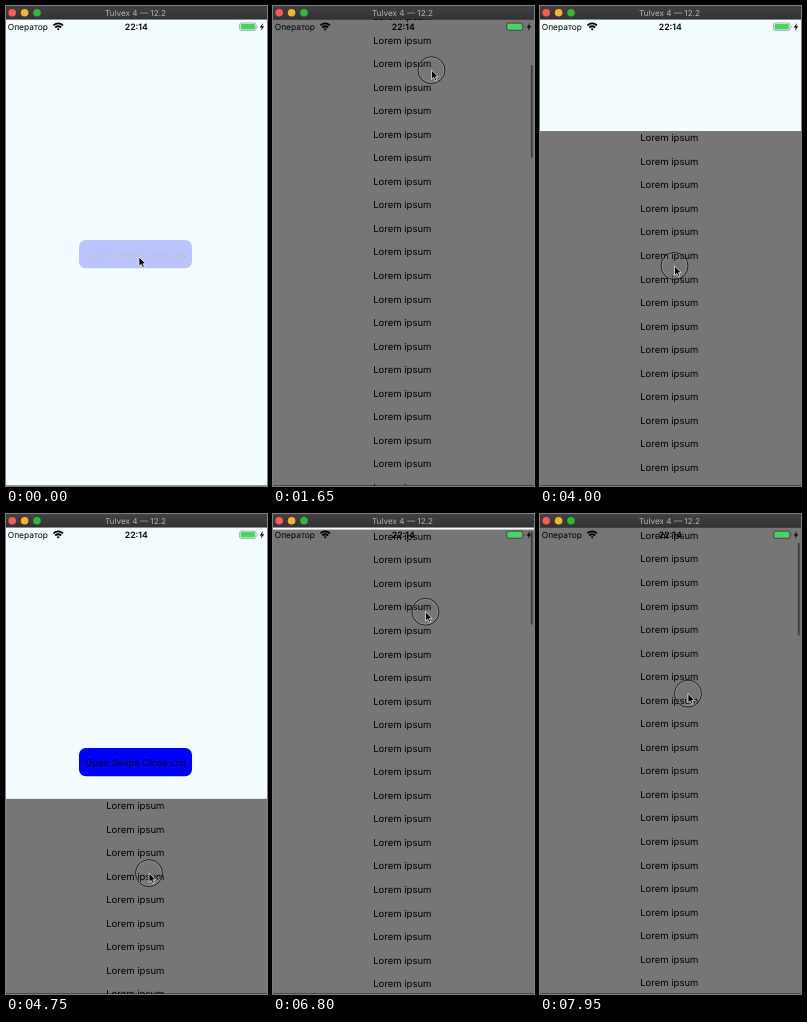
Recreate the animation shown at these times as an HTML page. Size 261 px wide and 480 px high, loop 8000 ms.

```html
<!DOCTYPE html>
<html lang="en">
<head>
<meta charset="utf-8">
<title>Swipe to close list</title>
<style>
  html, body { margin: 0; width: 100%; height: 100%; overflow: hidden; background: #f3fdff; }
  svg { display: block; width: 100vw; height: 100vh; }
  text { font: 9.5px Inter, Roboto, sans-serif; text-anchor: middle; text-rendering: geometricPrecision; }
  .title { font-size: 8.2px; fill: #b4b4b6; }
  .status { font-size: 8.4px; }
  .carrier { text-anchor: start; }
  .clock { font-weight: 600; font-size: 8.7px; }
</style>
</head>
<body>
<svg viewBox="0 0 261 480">
  <defs>
    <linearGradient id="chrome" x2="0" y2="1">
      <stop stop-color="#424244"/><stop offset="1" stop-color="#323234"/>
    </linearGradient>
  </defs>
  <rect width="261" height="480" fill="#f3fdff"/>

  <g id="button">
    <rect x="73" y="234" width="113" height="28.3" rx="6.8" fill="#00f"/>
    <text x="129.6" y="251.6">Open Swipe Close List</text>
  </g>

  <g id="sheet">
    <rect width="261" height="480" fill="#767676"/>
    <g id="rows"></g>
    <rect id="bar" x="257.8" width="1.9" height="93" rx=".9" fill="#404040"/>
  </g>

  <g id="statusbar">
    <text class="status carrier" x="1.8" y="24">Оператор</text>
    <path d="M47.4 19.4Q52.2 15.2 57 19.4M49.2 21.5Q52.2 19 55.2 21.5" fill="none" stroke="#000" stroke-width="1.7"/>
    <path d="M50.7 22.9Q52.2 21.8 53.7 22.9L52.2 24.5Z"/>
    <text class="status clock" x="130.3" y="24">22:14</text>
    <rect x="233.6" y="17" width="16.4" height="7.6" rx="2" fill="none" stroke="#000" stroke-opacity=".45" stroke-width=".7"/>
    <rect x="234.7" y="18.1" width="14.2" height="5.4" rx="1.1" fill="#45d45f"/>
    <path d="M251 19.5q1.3 1.3 0 2.6z" fill-opacity=".5"/>
    <path d="M257 17l-3.3 4.4h2l-.8 3.4 3.3-4.6h-2z"/>
  </g>

  <rect width="261" height="13" fill="url(#chrome)"/>
  <rect y="13" width="261" height="1" fill-opacity=".45"/>
  <circle cx="6.2" cy="6.8" r="3.8" fill="#fc5b53"/>
  <circle cx="18.6" cy="6.8" r="3.8" fill="#f6b42c"/>
  <circle cx="31" cy="6.8" r="3.8" fill="#2fb936"/>
  <text class="title" x="129.5" y="9.9">Tulvex 4 — 12.2</text>
  <rect y="479" width="261" height="1" fill-opacity=".4"/>

  <g id="pointer">
    <g id="touch" fill="none">
      <circle r="13.4" stroke="#1c1c1c"/>
      <circle r="12.5" stroke="#fff" stroke-opacity=".3" stroke-width=".7"/>
    </g>
    <path d="M0 0V9.2L2.2 7.3 3.7 10.5 5.3 9.8 3.9 6.7H6.8Z" stroke="#fff" stroke-width=".7"/>
  </g>
</svg>

<script>
const LOOP = 8000, TOP = 13, HEIGHT = 467, PITCH = 23.55;
const $ = id => document.getElementById(id);

const progress = (t, from, to) => Math.min(1, Math.max(0, (t - from) / (to - from)));
const ramp = (t, from, to) => {
  const u = progress(t, from, to);
  return u * u * (3 - 2 * u);
};
const pulse = (t, from, to) => ramp(t, from, from + 80) - ramp(t, to, to + 250);

// Fraction of the sheet pushed below the screen: open, drag away, reopen, short pull.
function sheetShift(t) {
  return 1 - ramp(t, 100, 600)
    + .65 * progress(t, 3475, 4900) + .35 * ramp(t, 4900, 5150)
    - ramp(t, 5750, 6250)
    + .28 * (ramp(t, 6760, 7250) - ramp(t, 7400, 7720));
}

function scrollOffset(t) {
  return 300 * (ramp(t, 1060, 1950) - ramp(t, 2050, 2728)) + 88 * ramp(t, 7720, 8050);
}

// Pointer stops; "down" means the finger touches until the next stop.
const stops = [
  { at: 300, x: 133, y: 251 },
  { at: 1000, x: 150, y: 285, down: true },
  { at: 1700, x: 158.6, y: 61 },
  { at: 2050, x: 156, y: 100, down: true },
  { at: 2550, x: 144.3, y: 350 },
  { at: 3400, x: 130.5, y: 213, down: true },
  { at: 5100, x: 144.5, y: 377 },
  { at: 5550, x: 131, y: 250, down: true },
  { at: 5660, x: 131, y: 250 },
  { at: 6750, x: 152.5, y: 95, down: true },
  { at: 7350, x: 152, y: 230 },
  { at: 7700, x: 150, y: 249, down: true },
  { at: 8100, x: 147, y: 148 }
];

function pointerAt(t) {
  const next = stops.findIndex(stop => stop.at > t);
  const b = stops[next], a = stops[next - 1] || b;
  const u = ramp(t, a.at, b.at);
  return { x: a.x + (b.x - a.x) * u, y: a.y + (b.y - a.y) * u, down: a !== b && a.down };
}

for (let i = 0; i < 36; i++) {
  const row = document.createElementNS("http://www.w3.org/2000/svg", "text");
  row.textContent = "Lorem ipsum";
  row.setAttribute("x", 129.3);
  row.setAttribute("y", 10.2 + i * PITCH);
  $("rows").append(row);
}

const move = (id, x, y) => $(id).setAttribute("transform", `translate(${x} ${y})`);
const fade = (id, opacity) => $(id).setAttribute("opacity", opacity);

function draw(t) {
  const offset = scrollOffset(t), pointer = pointerAt(t);
  move("sheet", 0, TOP + HEIGHT * sheetShift(t));
  move("rows", 0, -offset);
  move("bar", 0, 2 + offset * .199);
  move("pointer", pointer.x, pointer.y);
  fade("touch", pointer.down ? 1 : 0);
  fade("button", 1 - .78 * (pulse(t, -200, 50) + pulse(t, 5550, 5660)));
  fade("bar", pulse(t, 950, 3400) + pulse(t, 6700, 6900) + pulse(t, 7680, LOOP));
}

const start = performance.now();
function tick() {
  draw((performance.now() - start) % LOOP);
  requestAnimationFrame(tick);
}
tick();
</script>
</body>
</html>
```
